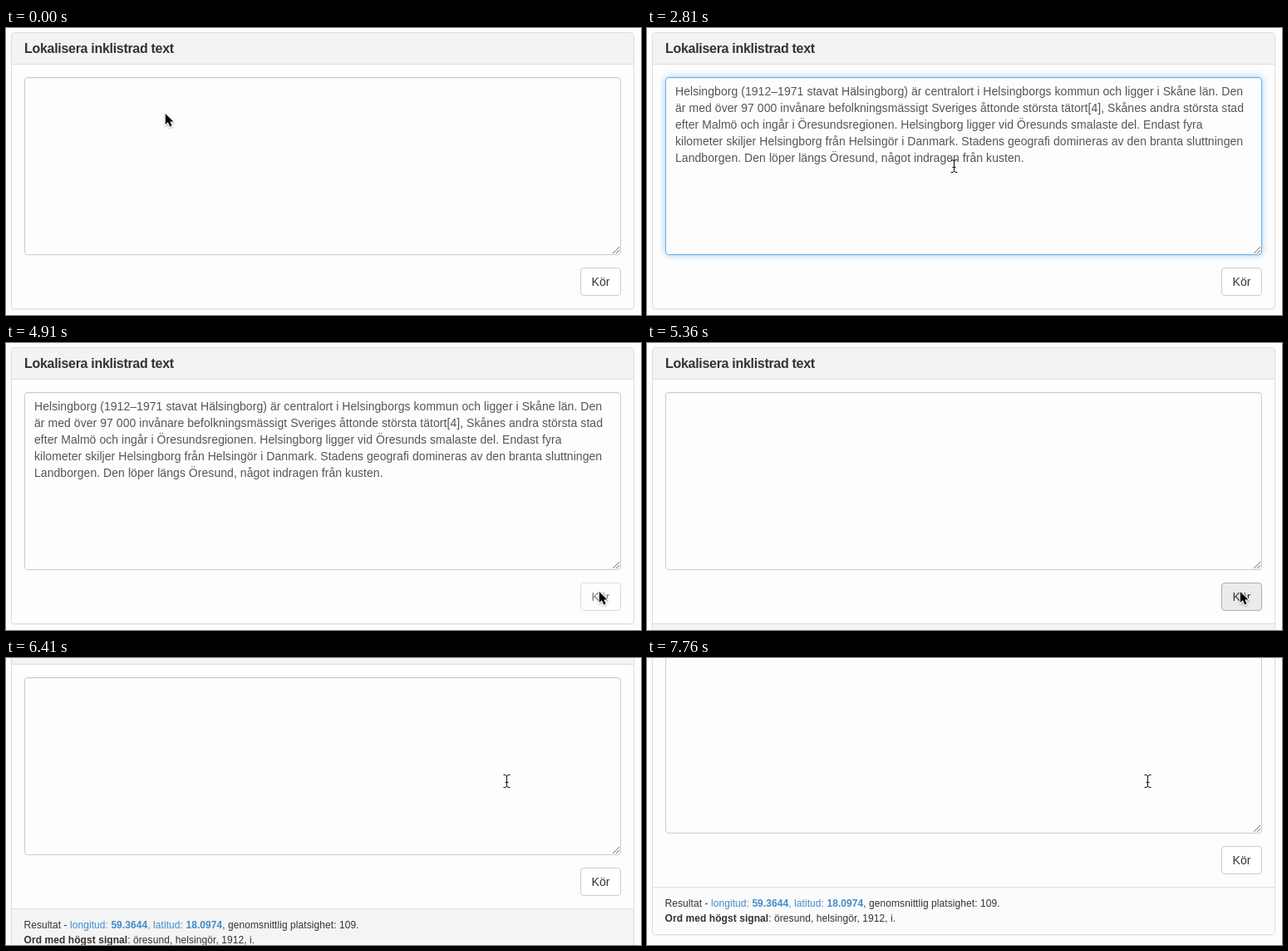
Animation, 764 px wide and 345 px high, one loop 8 s. Source, as an HTML page:

```html
<!DOCTYPE html>
<html lang="sv">
<head>
<meta charset="utf-8">
<title>Lokalisera inklistrad text</title>
<style>
* { box-sizing: border-box; }
html, body { margin: 0; width: 100%; height: 100%; overflow: hidden; background: #fdfdfd; }
body { position: relative; color: #333; font: 14px/20px "Liberation Sans", Arial, sans-serif; }

.page, .page > *, .panel > *, .cursor, .cursor > * { position: absolute; }
.page, .panel, .head, .foot, .area, .text, .caret, .btn, .cursor, .cursor > * {
  animation: 8s step-end infinite;
}

.page { left: 0; top: 0; width: 764px; height: 407px; animation-name: scroll; }

.panel {
  left: 6px; top: 5px; width: 750px; height: 333px; overflow: hidden;
  border: 1px solid #ddd; border-radius: 4px;
  box-shadow: 0 1px 1px rgba(0, 0, 0, .05);
  animation-name: grow;
}
.head {
  left: 0; top: 0; width: 100%; height: 38px; padding: 10px 15px;
  background: #f3f3f3; border-bottom: 1px solid #ddd;
  font-size: 16px; font-weight: bold; line-height: 18px; letter-spacing: -.3px;
}
.foot {
  left: 0; top: 331px; width: 100%; height: 57px; padding: 10px 14.5px;
  border-top: 1px solid #ddd; background: #f4f4f4;
  font-size: 12px; line-height: 18px; letter-spacing: .07px; white-space: nowrap;
  animation-name: foot;
}
.foot span { color: #428bca; }

.area {
  left: 22px; top: 59px; width: 718px; height: 214px;
  border: 1px solid #ccc; border-radius: 4px;
  box-shadow: inset 0 1px 1px rgba(0, 0, 0, .075);
  animation-name: focus;
}
.area svg { position: absolute; right: 0; bottom: 0; }
.text {
  left: 34px; top: 66px; color: #555; white-space: pre; letter-spacing: .05px;
  opacity: 0; animation-name: paste;
}
.caret { left: 35px; top: 66px; width: 1px; height: 16px; background: #333; opacity: 0; animation-name: caret; }

.btn {
  left: 691px; top: 288px; width: 49px; height: 34px;
  border: 1px solid #ccc; border-radius: 4px; background: #fff;
  line-height: 32px; text-align: center;
  animation-name: press;
}

.cursor { left: 0; top: 0; animation-name: move; }
.cursor > * { left: 0; top: 0; overflow: visible; }
.arrow { animation-name: arrow; }
.beam { animation-name: beam; }

@keyframes scroll {
  0% { transform: none; }
  76.375% { transform: translateY(-2px); }
  78.25% { transform: translateY(-14px); }
  80.125% { transform: translateY(-36px); }
  82% { transform: translateY(-54px); }
  83.875% { transform: translateY(-62px); }
  85.75% { transform: translateY(-65px); }
  95.125% { transform: translateY(-63px); }
  97%, 100% { transform: translateY(-62px); }
}
@keyframes grow {
  0% { height: 333px; }
  67%, 100% { height: 390px; }
}
@keyframes foot {
  0% { visibility: hidden; background: #f4f4f4; }
  67% { visibility: visible; background: #f4f4f4; }
  85.75%, 100% { visibility: visible; background: #fbfbfb; }
}
@keyframes focus {
  0%, 59.5%, 100% { border-color: #ccc; box-shadow: inset 0 1px 1px rgba(0, 0, 0, .075); }
  14.75%, 57.625% {
    border-color: #99bedb;
    box-shadow: inset 0 1px 1px rgba(0, 0, 0, .075), 0 0 4px rgba(102, 175, 233, .3);
  }
  16.625% {
    border-color: #66afe9;
    box-shadow: inset 0 1px 1px rgba(0, 0, 0, .075), 0 0 8px rgba(102, 175, 233, .6);
  }
}
@keyframes paste {
  0%, 67%, 100% { opacity: 0; }
  22.25% { opacity: 1; }
}
@keyframes caret {
  0% { opacity: 0; transform: none; }
  14.75% { opacity: 1; transform: none; }
  22.25%, 37%, 48.25% { opacity: 1; transform: translate(418px, 80px); }
  29.625%, 42.625%, 53.875%, 100% { opacity: 0; transform: translate(418px, 80px); }
}
@keyframes press {
  0%, 68.875%, 100% { background: #fff; border-color: #ccc; opacity: 1; box-shadow: none; }
  50.125%, 67% { background: #ebebeb; border-color: #adadad; opacity: 1; box-shadow: none; }
  55.75% {
    background: #ebebeb; border-color: #adadad; opacity: 1;
    box-shadow: inset 0 3px 5px rgba(0, 0, 0, .125);
  }
  57.625% { background: #fff; border-color: #ccc; opacity: .65; box-shadow: none; }
}
@keyframes move {
  0% { transform: translate(191px, 102px); }
  5.625% { transform: translate(176px, 99px); }
  7.5% { transform: translate(138px, 92px); }
  9.375% { transform: translate(98px, 86px); }
  11.25% { transform: translate(72px, 85px); }
  13.125% { transform: translate(63px, 86px); }
  35.125% { transform: translate(369px, 166px); }
  37% { transform: translate(455px, 200px); }
  38.875% { transform: translate(489px, 217px); }
  42.625% { transform: translate(500px, 222px); }
  44.5% { transform: translate(540px, 238px); }
  46.375% { transform: translate(600px, 262px); }
  48.25% { transform: translate(655px, 282px); }
  50.125% { transform: translate(692px, 293px); }
  52% { transform: translate(708px, 297px); }
  53.875% { transform: translate(713px, 298px); }
  68.875% { transform: translate(690px, 262px); }
  70.75% { transform: translate(630px, 185px); }
  72.625%, 100% { transform: translate(602px, 148px); }
}
@keyframes arrow {
  0%, 48.25% { opacity: 1; }
  5.625%, 68.875%, 100% { opacity: 0; }
}
@keyframes beam {
  0%, 48.25% { opacity: 0; }
  5.625%, 68.875%, 100% { opacity: 1; }
}
</style>
</head>
<body>
<div class="page">
  <div class="panel">
    <div class="head">Lokalisera inklistrad text</div>
    <div class="foot">Resultat - <span>longitud: <b>59.3644</b>, latitud: <b>18.0974</b></span>, genomsnittlig platsighet: 109.<br><b>Ord med högst signal</b>: öresund, helsingör, 1912, i.</div>
  </div>
  <div class="area">
    <svg width="10" height="10" stroke="#777" stroke-width="1"><path d="M1 9 9 1M5 9 9 5"/></svg>
  </div>
  <div class="text">Helsingborg (1912–1971 stavat Hälsingborg) är centralort i Helsingborgs kommun och ligger i Skåne län. Den
är med över 97 000 invånare befolkningsmässigt Sveriges åttonde största tätort[4], Skånes andra största stad
efter Malmö och ingår i Öresundsregionen. Helsingborg ligger vid Öresunds smalaste del. Endast fyra
kilometer skiljer Helsingborg från Helsingör i Danmark. Stadens geografi domineras av den branta sluttningen
Landborgen. Den löper längs Öresund, något indragen från kusten.</div>
  <div class="caret"></div>
  <div class="btn">Kör</div>
</div>
<div class="cursor">
  <svg class="arrow" width="14" height="20">
    <path d="M.8 1V14L3.9 11.2 6.2 16.6 8.6 15.6 6.3 10.4H10.4Z" stroke="#fff" stroke-width="2" paint-order="stroke"
      style="filter: drop-shadow(0 1px 1px rgba(0, 0, 0, .3))"/>
  </svg>
  <svg class="beam" width="1" height="1" fill="none" stroke="#111">
    <path d="M-3.5-7.5H-2Q.5-7.5.5-5V5.5Q.5 7.5-2 7.5H-3.5M4.5-7.5H3Q.5-7.5.5-5M4.5 7.5H3Q.5 7.5.5 5.5M-1.5 1.5H2.5"/>
  </svg>
</div>
</body>
</html>
```
